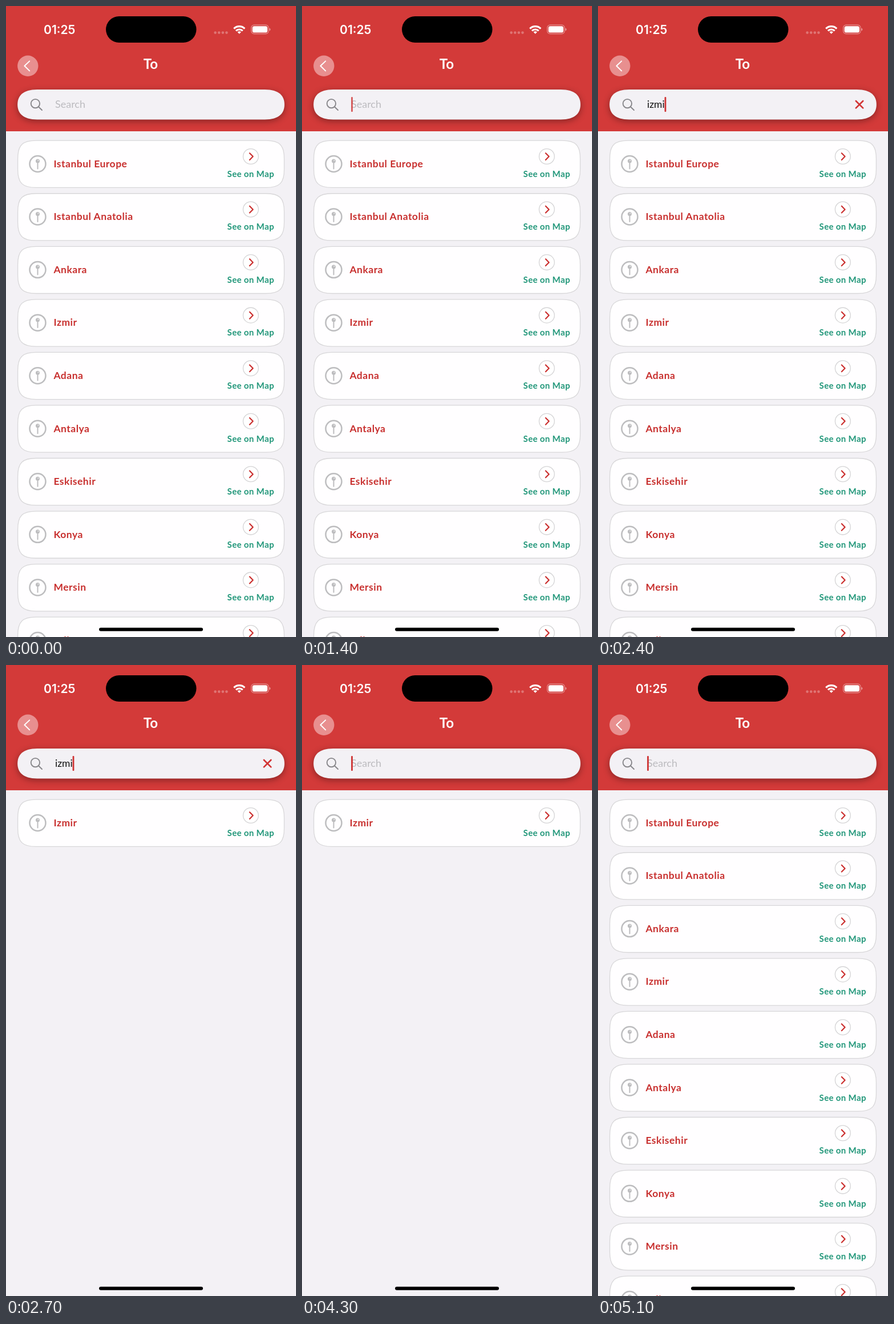
Write an HTML page that moves like this. It is 508x1103 px and loops after 5600 ms.

```html
<!DOCTYPE html>
<html lang="en">
<head>
<meta charset="utf-8">
<title>City search</title>
<style>
  html, body { margin: 0; width: 100%; height: 100%; overflow: hidden; background: #f3f1f5; }
  svg { display: block; width: 508px; height: 1103px; font-family: Lato, "Open Sans", sans-serif; }
  .line { fill: none; stroke-linecap: round; stroke-linejoin: round; }
  .card { fill: #fffeff; stroke: #d8d7d9; stroke-width: 1.3; }
  .city { font-size: 17.5px; font-weight: 700; letter-spacing: .5px; fill: #c8302f; }
  .map { font-size: 15px; font-weight: 700; letter-spacing: .35px; fill: #22977a; text-anchor: middle; }
  .clock { font: 600 21px Inter, sans-serif; text-anchor: middle; fill: #fff; }
  .title { font-size: 24px; font-weight: 700; text-anchor: middle; fill: #fff; }
  #pill { fill: #f3f1f5; filter: drop-shadow(0 3px 6px rgba(0, 0, 0, .36)); }
</style>
</head>
<body>
<svg viewBox="0 0 508 1103">
  <rect width="508" height="1103" fill="#f3f1f5"/>
  <g id="list"></g>

  <rect width="508" height="219" fill="#d33a39"/>
  <text class="clock" x="93.8" y="48.6">01:25</text>
  <rect x="175" y="18" width="158.5" height="46" rx="23"/>
  <g fill="#fff" fill-opacity=".3">
    <circle cx="366.6" cy="46.6" r="2.3"/><circle cx="373.2" cy="46.6" r="2.3"/>
    <circle cx="379.8" cy="46.6" r="2.3"/><circle cx="386.4" cy="46.6" r="2.3"/>
  </g>
  <g fill="none" stroke="#fff" stroke-width="3.1">
    <path d="M399.2 39.6a13.4 13.4 0 0 1 19 0"/>
    <path d="M402.8 43.4a8.4 8.4 0 0 1 11.8 0"/>
    <path d="M408.7 48.8l-3.2 -3.2a4.6 4.6 0 0 1 6.4 0z" fill="#fff" stroke="none"/>
  </g>
  <rect x="429.6" y="33.2" width="30.4" height="15.4" rx="5" fill="none" stroke="#fff" stroke-opacity=".45" stroke-width="1.2"/>
  <rect x="431.6" y="35.2" width="26.4" height="11.4" rx="3.4" fill="#fff"/>
  <path d="M461.4 38.4q2 .8 2 2.6t-2 2.6z" fill="#fff" fill-opacity=".5"/>

  <circle cx="38.3" cy="104.8" r="18.2" fill="#e88f8f"/>
  <path class="line" d="M41.2 96.4l-8.8 8.4 8.8 8.6" stroke="#fff" stroke-width="2"/>
  <text class="title" x="253.5" y="110">To</text>

  <path id="pill"/>
  <g class="line" stroke="#88878b" stroke-width="1.9">
    <circle cx="51.4" cy="170.6" r="7.7"/><path d="M57 176.2l6 5.8"/>
  </g>
  <text id="query" y="178"></text>
  <rect id="caret" y="159" width="2.8" height="26" rx="1" fill="#cf3333"/>
  <path id="clear" class="line" d="M451.8 166l12.4 12.4M464.2 166l-12.4 12.4" stroke="#d23535" stroke-width="2.7"/>

  <rect x="163" y="1086.8" width="182" height="6" rx="3"/>
</svg>
<script>
const $ = id => document.getElementById(id);
const cities = ["Istanbul Europe", "Istanbul Anatolia", "Ankara", "Izmir", "Adana",
  "Antalya", "Eskisehir", "Konya", "Mersin", "Adiyaman"];
const word = "izmi";
const caretX = [86.1, 91, 99.6, 113.6, 116.6];
const LOOP = 5600, PITCH = 92.55;

// start time, caret opacity, letters typed
const steps = [
  [0, 0, 0], [800, .5, 0], [900, 1, 0], [1400, .8, 0], [1500, .3, 0], [1600, 0, 0],
  [1800, .5, 0], [1900, 1, 0], [2000, 1, 1], [2100, 1, 2], [2200, 1, 3], [2400, 1, 4],
  [2900, .5, 4], [3000, 0, 4], [3300, .5, 4], [3400, 1, 4], [3900, .5, 4], [4000, 0, 4],
  [4100, 1, 0], [4600, .5, 0], [4700, 0, 0], [4900, .3, 0], [5000, .7, 0], [5100, 1, 0]
];

// Rectangle with smooth, continuous corners
function smoothRect(x, y, w, h, r) {
  const a = Math.min(r * 1.33, w / 2), b = Math.min(r * 1.33, h / 2);
  const c = (2.344 * r - a) / 3, d = (2.344 * r - b) / 3;
  const R = x + w, B = y + h;
  return `M${x + a} ${y}H${R - a}C${R - c} ${y} ${R} ${y + d} ${R} ${y + b}` +
    `V${B - b}C${R} ${B - d} ${R - c} ${B} ${R - a} ${B}` +
    `H${x + a}C${x + c} ${B} ${x} ${B - d} ${x} ${B - b}` +
    `V${y + b}C${x} ${y + d} ${x + c} ${y} ${x + a} ${y}Z`;
}

const cardShape = smoothRect(20.6, 235.2, 466.8, 82.2, 24);
const card = city => `<g>
  <path class="card" d="${cardShape}"/>
  <circle cx="55.5" cy="276" r="14" fill="none" stroke="#bdbdbf" stroke-width="2.5"/>
  <path class="line" d="M55.5 273v11.4" stroke="#bdbdbf" stroke-width="2"/>
  <circle cx="55.5" cy="271" r="3.5" fill="#bdbdbf"/>
  <circle cx="56.4" cy="270" r="1" fill="#efefef"/>
  <text class="city" x="83.4" y="281.8">${city}</text>
  <circle cx="428.8" cy="263" r="13.4" fill="#fff" stroke="#d4d3d5" stroke-width="1.3"/>
  <path class="line" d="M426.8 257.2l5.8 5.9-5.8 5.9" stroke="#cb3130" stroke-width="2.2"/>
  <text class="map" x="428.7" y="298.8">See on Map</text>
</g>`;

$("pill").setAttribute("d", smoothRect(20.2, 146, 467.6, 52.4, 26));
$("list").innerHTML = cities.map(card).join("");
const rows = [...$("list").children];

function draw(now) {
  const t = now % LOOP;
  const [, alpha, typed] = steps.findLast(s => s[0] <= t);
  const filtered = t >= 2700 && t < 4400;
  let slot = 0;
  rows.forEach((row, i) => {
    const shown = !filtered || cities[i].toLowerCase().startsWith(word);
    row.style.display = shown ? "" : "none";
    if (shown) row.setAttribute("transform", `translate(0 ${PITCH * slot++})`);
  });
  const query = $("query");
  query.textContent = typed ? word.slice(0, typed) : "Search";
  query.setAttribute("x", 86);
  query.setAttribute("font-size", typed ? 17.5 : 18);
  query.setAttribute("fill", typed ? "#111" : "#bcbbbf");
  $("caret").setAttribute("x", caretX[typed]);
  $("caret").setAttribute("opacity", alpha);
  $("clear").style.display = typed ? "" : "none";
}

const start = performance.now();
function tick() {
  draw(performance.now() - start);
  requestAnimationFrame(tick);
}
tick();
</script>
</body>
</html>
```
